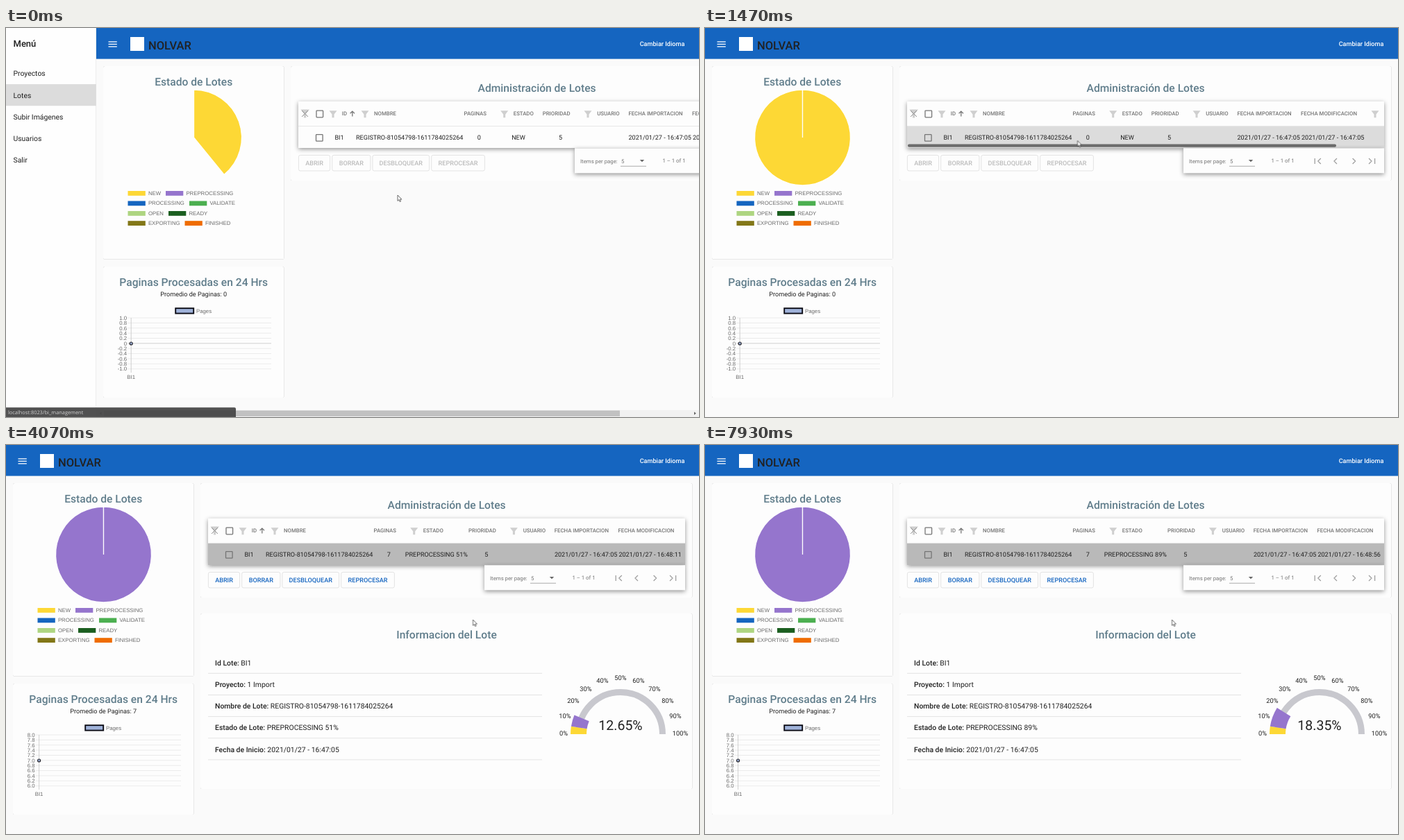
Recreate the animation shown at these times as an HTML page. Size 998x561 px, loop 8 s.

```html
<!DOCTYPE html>
<html lang="es">
<head>
<meta charset="utf-8">
<title>Administración de Lotes</title>
<style>
html, body { margin: 0; width: 100%; height: 100%; overflow: hidden; background: #fafafa; }
svg { display: block; width: 100vw; height: 100vh; font-family: Roboto, sans-serif; fill: #212121; }
text { text-rendering: geometricPrecision; white-space: pre; }
.m { text-anchor: middle; }
.e { text-anchor: end; }
.b { font-weight: 500; }
.title { fill: #607d8b; font-weight: 500; text-anchor: middle; }
.gray { fill: #757575; }
.white { fill: #fff; }
.chart { font-family: "Liberation Sans", Arial, sans-serif; fill: #6b6b6b; }
.url { font-family: "Open Sans", sans-serif; fill: #d0d0d0; }
.card { fill: #fdfdfd; filter: drop-shadow(0 .8px .7px rgba(0,0,0,.32)); }
.raised { fill: #fdfdfd; filter: drop-shadow(0 2.5px 3px rgba(0,0,0,.42)); }
.line { fill: none; stroke: #757575; stroke-width: 1.3; }
.pale { stroke: #a0a0a0; }

#shift { animation: slide 8s infinite; }
#overflow { animation: leave 8s infinite step-end; }
#row { animation: row 8s infinite step-end; }
#rowBar { animation: bar 8s infinite step-end; }
.label { animation: label 8s infinite step-end; }
#info { animation: info 8s infinite step-end; }
#cursor { animation: move 8s infinite; }

@keyframes slide {
  0%, .62% { transform: translateX(130px); animation-timing-function: cubic-bezier(.25,.8,.25,1); }
  3.2%, 100% { transform: none; }
}
@keyframes leave { 0% { opacity: 1; } 1.6%, 100% { opacity: 0; } }
@keyframes row { 0% { fill: #fdfdfd; } 17% { fill: #dcdcdc; } 19.4%, 100% { fill: #b9b9b9; } }
@keyframes bar { 0% { opacity: 0; } 17% { opacity: 1; } 21%, 100% { opacity: 0; } }
@keyframes label { 0% { fill: #bcbcbc; } 19.4%, 100% { fill: #1565c0; } }
@keyframes info { 0% { opacity: 0; } 19.4%, 100% { opacity: 1; } }
@keyframes move {
  0%, 11% { transform: translate(564px, 241px); animation-timing-function: ease-in-out; }
  18%, 20% { transform: translate(536.5px, 162.5px); animation-timing-function: ease-in-out; }
  25.6%, 100% { transform: translate(672.5px, 252px); }
}
</style>
</head>
<body>
<svg id="stage" viewBox="0 0 998 561" preserveAspectRatio="none"></svg>
<script>
// y is the middle of the capital letters
const text = (x, y, s, size, cls = '', id = '') =>
  `<text x="${x}" y="${(y + size * .356).toFixed(2)}" font-size="${size}" class="${cls}"${id && ` id="${id}"`}>${s}</text>`;
const rect = (x, y, w, h, fill, extra = '') =>
  `<rect x="${x}" y="${y}" width="${w}" height="${h}" fill="${fill}" ${extra}/>`;
const box = (x, y, w, h, cls, rx = 2.6) =>
  `<rect x="${x}" y="${y}" width="${w}" height="${h}" rx="${rx}" class="${cls}"/>`;
const path = (d, cls = '', extra = '') => `<path d="${d}" class="${cls}" ${extra}/>`;
const hline = (x1, x2, y, color) => path(`M${x1} ${y}H${x2}`, '', `stroke="${color}" stroke-width=".8"`);
const funnel = x => path(`M${x - 5.5} 119.2h11l-4 5.2v4.8h-3v-4.8z`, '', 'fill="#cfcfcf"');
const checkbox = (x, y) => box(x, y, 9.6, 9.6, 'line', .8);
const head = (x, s) => text(x, 123.2, s, 7.8, 'gray b m');
const cell = (x, s, id, cls = 'm') => text(x, 157.3, s, 9.1, cls, id);

const YELLOW = '#fdd835', PURPLE = '#9575cd';

function sidebar() {
  const items = ['Proyectos', 'Lotes', 'Subir Imágenes', 'Usuarios', 'Salir'];
  return `<g transform="translate(-130)">` + rect(0, 0, 130, 561, '#fefefe') +
    rect(0, 81, 130, 31.2, '#dcdcdc') + text(10.5, 22.5, 'Menú', 13, 'b') +
    items.map((s, i) => text(10.5, 65.7 + 31.2 * i, s, 10.4)).join('') +
    rect(129.4, 0, .6, 561, '#e2e2e2') + '</g>';
}

function header() {
  return rect(0, 0, 998, 44.6, '#1565c0') +
    path('M17.5 19.9h12.3M17.5 23.4h12.3M17.5 26.9h12.3', '', 'stroke="#fff" stroke-width="1.4"') +
    rect(49, 13, 20, 20, '#fff') +
    text(75, 25, 'NOLVAR', 16.5, 'b');
}

function pieCard() {
  const legend = [
    [45.5, 238, 'NEW', YELLOW], [100, 238, 'PREPROCESSING', PURPLE],
    [45.5, 252.5, 'PROCESSING', '#1565c0'], [134, 252.5, 'VALIDATE', '#4caf50'],
    [45.5, 267, 'OPEN', '#aed581'], [104, 267, 'READY', '#1b5e20'],
    [45.5, 281.2, 'EXPORTING', '#827717'], [127.5, 281.2, 'FINISHED', '#ef6c00']];
  return box(10, 55, 260.5, 278.5, 'card') + text(140.2, 77, 'Estado de Lotes', 15.6, 'title') +
    '<g stroke="#fff" stroke-width="1.3">' +
    path('', '', `id="pieNew" fill="${YELLOW}"`) + path('', '', `id="piePre" fill="${PURPLE}"`) + '</g>' +
    legend.map(([x, y, s, c]) => rect(x, y - 3, 25.3, 6.8, c) + text(x + 29.4, y, s, 7.8, 'chart')).join('');
}

function plot(id, ax, top, zero) {
  let s = `<g id="${id}">`;
  for (let i = 0; i < 11; i++) {
    const y = 418 + 7.37 * i, v = top - i * .2;
    s += hline(ax - 5, 252, y, zero && i === 5 ? '#c4c4c4' : '#e8e8e8') +
      text(ax - 6, y, Math.abs(v) < .01 ? '0' : v.toFixed(1), 7.8, 'chart e');
  }
  return s + path(`M${ax} 418V497`, '', 'stroke="#c4c4c4" stroke-width=".8"') +
    text(ax, 503, 'BI1', 7.8, 'chart m') + '</g>';
}

function pagesCard() {
  return box(10, 344, 260.5, 189, 'card') + text(140.2, 366, 'Paginas Procesadas en 24 Hrs', 15.6, 'title') +
    text(140.2, 383.3, '', 9.1, 'm', 'average') +
    rect(114.2, 404.2, 26, 7.4, '#9fb2d9', 'stroke="#0b0b14" stroke-width="1.9"') +
    text(144, 407.8, 'Pages', 7.8, 'chart') +
    plot('plotLow', 50.2, 1, true) + plot('plotHigh', 47.6, 8, false) +
    '<circle id="point" cy="455" r="2" fill="#9fb2d9" stroke="#26262e" stroke-width="1.2"/>';
}

function paginator() {
  return box(689, 173.3, 289, 36, 'raised', 0) +
    text(697, 191.8, 'Items per page:', 7.8, 'gray') + text(756, 191.8, '5', 7.8, 'gray') +
    hline(755, 792, 199.3, '#9a9a9a') + path('M782.8 190h6.4l-3.2 3.2z', '', 'fill="#666"') +
    text(832, 191.5, '1 – 1 of 1', 7.8, 'gray m') +
    path('M878.2 188v8M886.8 188l-4 4 4 4M910 188l-4 4 4 4M932.6 188l4 4-4 4M956 188l4 4-4 4M964.6 188v8', 'line pale');
}

function adminCard() {
  const buttons = [['ABRIR', 291, 46], ['BORRAR', 339.3, 56], ['DESBLOQUEAR', 397.5, 82.5], ['REPROCESAR', 482.3, 77.5]];
  return box(280, 55, 708.5, 165, 'card') + text(634.6, 86, 'Administración de Lotes', 15.6, 'title') +
    buttons.map(([s, x, w]) =>
      rect(x + .4, 183.4, w - .8, 22.6, '#fdfdfd', 'rx="2.4" stroke="#dcdcdc" stroke-width=".8"') +
      text(x + w / 2, 194.7, s, 9.1, 'b m label')).join('') +
    box(291, 105.8, 687, 67, 'raised', 0) +
    '<g clip-path="url(#tableClip)">' + rect(291, 141.8, 687, 31.2, '#fdfdfd', 'id="row"') +
    hline(291, 978, 141.6, '#e0e0e0') +
    path('M294.5 117.5h12.5l-4.7 6v6h-3.4v-6z', '', 'fill="#cfcfcf"') +
    path('M296 119l9 9M305 119l-9 9', 'line', 'style="stroke:#8f8f8f;stroke-width:1"') +
    checkbox(317, 119.2) + checkbox(316.5, 153.6) +
    [341, 387, 587.7].map(funnel).join('') +
    head(357.5, 'ID') + path('M368.8 127.5v-7M365.6 123.3l3.2-3.2 3.2 3.2', 'line') +
    head(416, 'NOMBRE') + head(545.8, 'PAGINAS') + head(615.3, 'ESTADO') +
    cell(350, 'BI1') + cell(374, 'REGISTRO-81054798-1611784025264', '', '') +
    cell(551.4, '', 'pages') + cell(608, '', 'state') +
    '<g id="cols">' + head(662.6, 'PRIORIDAD') + funnel(708) + head(737.5, 'USUARIO') +
    head(805.5, 'FECHA IMPORTACION') + head(898.5, 'FECHA MODIFICACION') + funnel(965) +
    cell(668.5, '5') + cell(766.5, '2021/01/27 - 16:47:05', '', '') + cell(859, '', 'modified', '') + '</g>' +
    '<rect id="rowBar" x="292" y="167.6" width="617" height="4.2" rx="2" fill="#6c6c6c"/></g>' + paginator();
}

function infoCard() {
  const rows = [['Id Lote', 'BI1'], ['Proyecto', '1 Import'], ['Nombre de Lote', 'REGISTRO-81054798-1611784025264'],
    ['Estado de Lote', '<tspan id="infoState"></tspan>'], ['Fecha de Inicio', '2021/01/27 - 16:47:05']];
  const dx = [82, 80, 68, 50, 26, 0, -26, -49, -68, -79, -86], ly = [416, 391, 369, 351.3, 340, 336];
  return '<g id="info">' + box(280, 243, 708.5, 253, 'card') +
    text(634.5, 273.5, 'Informacion del Lote', 15.6, 'title') +
    rows.map(([k, v], i) => text(301, 314.3 + 31.15 * i, `<tspan class="b">${k}:</tspan> ${v}`, 10.4) +
      hline(291, 772, 329.3 + 31.15 * i, '#dedede')).join('') +
    '<g fill="none">' + path(band(0, 1), '', 'stroke="#c8c8ce" stroke-width="9"') +
    path('', '', `id="gaugeNew" stroke="${YELLOW}" stroke-width="23"`) +
    path('', '', `id="gaugePre" stroke="${PURPLE}" stroke-width="23"`) + '</g>' +
    dx.map((d, i) => text(885 - d, ly[Math.min(i, 10 - i)], i * 10 + '%', 9.3, 'm')).join('') +
    text(885, 404.5, '', 19.5, 'm', 'gaugeText') + '</g>';
}

// half-circle gauge, from and to in 0..1
function band(from, to) {
  const at = f => `${885 - 60.5 * Math.cos(Math.PI * f)} ${417 - 60.5 * Math.sin(Math.PI * f)}`;
  return `M${at(from)}A60.5 60.5 0 0 1 ${at(to)}`;
}

// pie slice, degrees clockwise from the top
function slice(from, to) {
  if (to - from < .3) return '';
  to = Math.min(to, from + 359.9);
  const at = a => `${140.5 + 69 * Math.sin(a * Math.PI / 180)} ${158 - 69 * Math.cos(a * Math.PI / 180)}`;
  return `M140.5 158L${at(from)}A69 69 0 ${to - from > 180 ? 1 : 0} 1 ${at(to)}Z`;
}

function overflow() {
  return '<g id="overflow">' + rect(130, 551, 868, 10, '#f1f1f1') + rect(141, 551.6, 743, 8.4, '#c1c1c1') +
    path('M137.5 553.5v4.6l-2.8-2.3zM991 553.5v4.6l2.8-2.3z', '', 'fill="#606060"') +
    path('M0 547.3h329a2 2 0 0 1 2 2V561H0z', '', 'fill="#474747" fill-opacity=".94"') +
    text(3, 554.2, 'localhost:8023/bi_management', 7.4, 'url') + '</g>';
}

document.getElementById('stage').innerHTML =
  '<clipPath id="tableClip"><rect x="291" y="100" width="687" height="73"/></clipPath>' +
  '<g id="shift">' + header() + pieCard() + pagesCard() + adminCard() + infoCard() + sidebar() + '</g>' +
  text(945, 22.9, 'Cambiar Idioma', 9.1, 'white b m') + overflow() +
  path('M0 0v8.4l1.9-1.8 1.3 3 1.4-.6-1.3-2.9h2.6z', '', 'id="cursor" fill="#fff" stroke="#444" stroke-width=".8"');

const $ = id => document.getElementById(id);
const put = (id, s) => { if ($(id).textContent !== s) $(id).textContent = s; };
const clamp = v => Math.max(0, Math.min(1, v));
const outQuart = p => 1 - (1 - clamp(p)) ** 4;
const outQuad = p => 1 - (1 - clamp(p)) ** 2;

const LOOP = 8000, CLICK = 1550, UPDATE = 2479;
// start time, percent done, seconds part of the modification time
const steps = [[0, 0, '47:05'], [UPDATE, 33, '47:12'], [3330, 51, '48:11'], [4730, 61, '48:39'], [7330, 89, '48:56']];
const share = pct => (5 + .15 * pct) / 100;

function draw(t) {
  const n = steps.findLastIndex(s => t >= s[0]);
  const [start, pct, time] = steps[n], busy = n > 0;

  const open = outQuart(t < 200 ? .116 + t * .000635 : .243 + (t - 200) / 1000);
  const turn = outQuart((t - UPDATE) / 1000);
  const edge = busy ? 360 * (1 - turn) : 360 * open;
  $('pieNew').setAttribute('d', slice(0, edge));
  $('piePre').setAttribute('d', busy ? slice(edge, 360) : '');

  $('plotLow').style.display = busy ? 'none' : '';
  $('plotHigh').style.display = busy ? '' : 'none';
  $('point').setAttribute('cx', 50.2 - 2.6 * turn);
  put('average', 'Promedio de Paginas: ' + (busy ? 7 : 0));

  const state = busy ? `PREPROCESSING ${pct}%` : 'NEW';
  put('pages', busy ? '7' : '0');
  put('state', state);
  put('infoState', state);
  put('modified', '2021/01/27 - 16:' + time);
  $('state').setAttribute('x', busy ? 619.8 : 608);
  $('cols').setAttribute('transform', `translate(${busy ? 23.4 : 0})`);

  const prev = share(busy ? steps[n - 1][1] : 0);
  const end = prev + (share(pct) - prev) * outQuad((t - start) / 1000);
  $('gaugeNew').setAttribute('d', band(0, .05 * outQuad((t - CLICK) / 500)));
  $('gaugePre').setAttribute('d', busy ? band(.05, end) : '');
  put('gaugeText', busy ? (share(pct) * 100).toFixed(2) + '%' : '5%');
}

const t0 = performance.now();
function tick() {
  draw((performance.now() - t0) % LOOP);
  requestAnimationFrame(tick);
}
tick();
</script>
</body>
</html>
```
